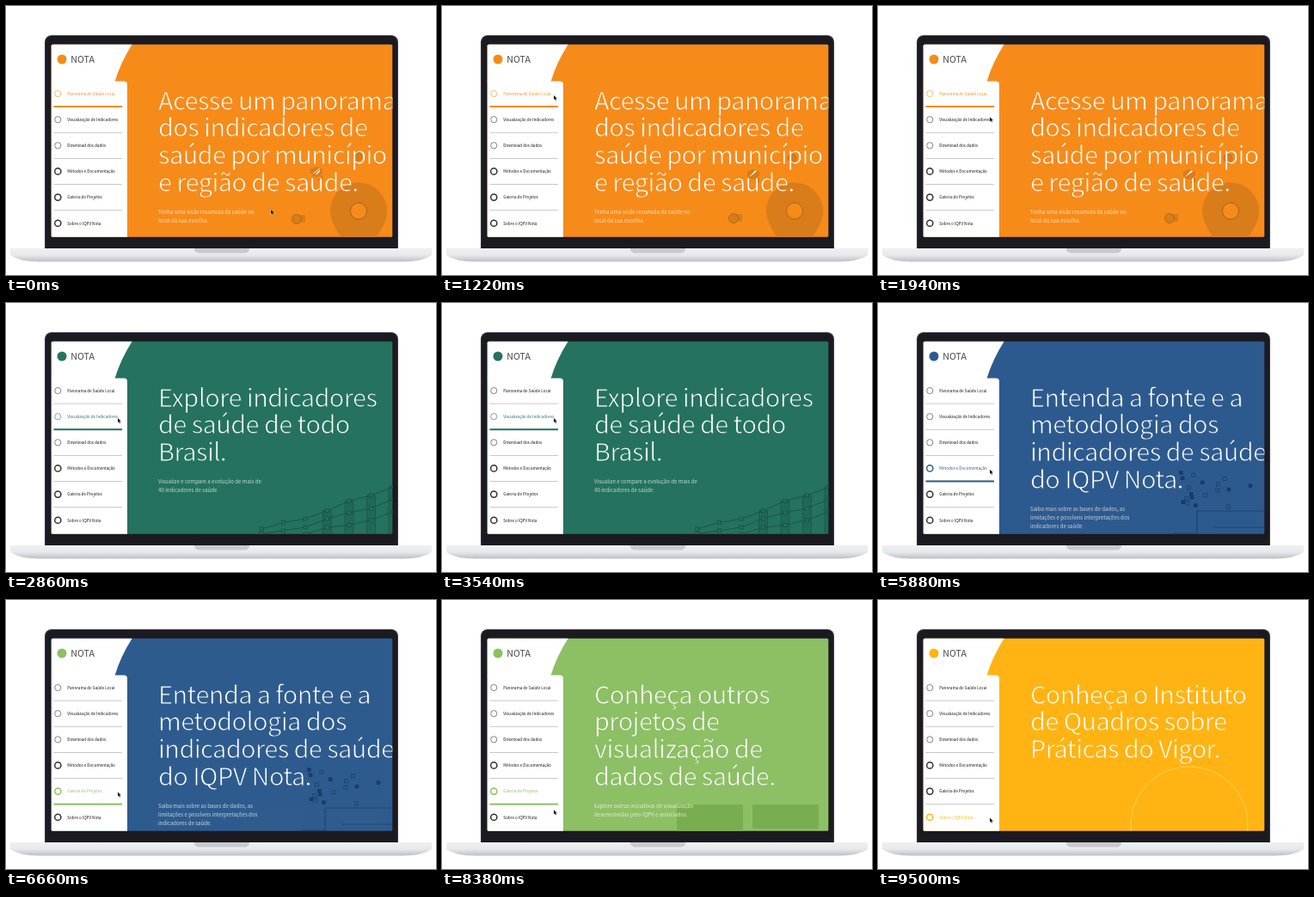
These frames come from a looping animation (500 px wide and 313 px high, 9520 ms). An HTML page with a canvas:

```html
<!DOCTYPE html>
<html lang="pt">
<head>
<meta charset="utf-8">
<title>Nota</title>
<style>
html, body { margin: 0; width: 100%; height: 100%; overflow: hidden; background: #fff; }
canvas { display: block; width: 500px; height: 313px; }
</style>
</head>
<body>
<canvas id="stage"></canvas>
<script>
const W = 500, H = 313, LOOP = 9520, FADE = 200;
const ROW = 30.15;
const ratio = window.devicePixelRatio || 1;
const canvas = document.getElementById('stage');
const ctx = fit(canvas);

const SANS = '"Noto Sans CJK JP", "Noto Sans CJK SC", "Open Sans", sans-serif';
const MENU = ['Panorama de Saúde Local', 'Visualização de Indicadores', 'Download dos dados',
  'Métodos e Documentação', 'Galeria de Projetos', 'Sobre o IQPV Nota'];

const SECTIONS = [
  { at: 0, color: '#f68b1a', art: drawPin,
    title: ['Acesse um panorama', 'dos indicadores de', 'saúde por município', 'e região de saúde.'],
    note: ['Tenha uma visão resumida da saúde no', 'local da sua escolha.'] },
  { at: 2000, color: '#24725f', art: drawChart,
    title: ['Explore indicadores', 'de saúde de todo', 'Brasil.'],
    note: ['Visualize e compare a evolução de mais de', '40 indicadores de saúde.'] },
  { at: 3900, color: '#59254a', art: drawGrid,
    title: ['Acesse e baixe os', 'dados completos do', 'IQPV Nota.'],
    note: ['Ou selecione os dados por local, ano, e', 'grupo de indicadores de seu interesse.'] },
  { at: 5250, color: '#2d5a8e', art: drawBlocks,
    title: ['Entenda a fonte e a', 'metodologia dos', 'indicadores de saúde', 'do IQPV Nota.'],
    note: ['Saiba mais sobre as bases de dados, as', 'limitações e possíveis interpretações dos', 'indicadores de saúde.'] },
  { at: 6650, color: '#8dbf65', art: drawCards,
    title: ['Conheça outros', 'projetos de', 'visualização de', 'dados de saúde.'],
    note: ['Explore outras iniciativas de visualização', 'desenvolvidas pelo IQPV e associados.'] },
  { at: 8480, color: '#ffb414', art: drawRing,
    title: ['Conheça o Instituto', 'de Quadros sobre', 'Práticas do Vigor.'], note: [] }
];

function fit(el) {
  el.width = W * ratio;
  el.height = H * ratio;
  const c = el.getContext('2d');
  c.scale(ratio, ratio);
  return c;
}

function ease(p) {
  p = Math.min(1, Math.max(0, p));
  return p * p * (3 - 2 * p);
}

function randomFrom(seed) {
  return () => (seed = (seed * 16807) % 2147483647) / 2147483647;
}

function text(str, x, y, size, color) {
  ctx.font = `${size}px ${SANS}`;
  ctx.fillStyle = color;
  ctx.fillText(str, x, y);
}

// Light lettering: the regular weight with its outline shaved off.
function lightLayer(rows, x, y, step, size, spacing, shave, color) {
  const layer = document.createElement('canvas');
  const c = fit(layer);
  c.font = `${size}px ${SANS}`;
  c.letterSpacing = spacing + 'px';
  c.lineJoin = 'round';
  c.lineWidth = shave;
  c.fillStyle = color;
  rows.forEach((row, i) => c.fillText(row, x, y + i * step));
  c.globalCompositeOperation = 'destination-out';
  rows.forEach((row, i) => c.strokeText(row, x, y + i * step));
  return layer;
}

function box(x, y, w, h, r, fill) {
  ctx.beginPath();
  ctx.roundRect(x, y, w, h, r);
  ctx.fillStyle = fill;
  ctx.fill();
}

function frame(x, y, w, h, color, width = 0.7) {
  ctx.strokeStyle = color;
  ctx.lineWidth = width;
  ctx.strokeRect(x, y, w, h);
}

function disc(x, y, r, fill, stroke, width = 0.7) {
  ctx.beginPath();
  ctx.arc(x, y, r, 0, 7);
  if (fill) { ctx.fillStyle = fill; ctx.fill(); }
  if (stroke) { ctx.strokeStyle = stroke; ctx.lineWidth = width; ctx.stroke(); }
}

function line(points, color, width = 0.7) {
  ctx.beginPath();
  points.forEach(p => ctx.lineTo(p[0], p[1]));
  ctx.strokeStyle = color;
  ctx.lineWidth = width;
  ctx.stroke();
}

function drawPin(t) {
  const tone = '#d97c1a', edge = '#96591c';
  const sway = ease(t / 1220);
  ctx.beginPath();
  ctx.arc(410, 238.5, 33, Math.PI * 0.85, Math.PI * 0.15);
  ctx.quadraticCurveTo(434, 268, 410, 292);
  ctx.quadraticCurveTo(386, 268, 381, 253.5);
  ctx.fillStyle = tone;
  ctx.fill();
  disc(410, 238.5, 9.5, '#f68b1a', edge);
  const x = 361 + sway, y = 193 + 3 * sway;
  disc(x, y, 6, tone);
  box(x - 7, y - 4, 14, 6, 1, tone);
  line([[x - 4, y + 2], [x + 4, y - 4]], '#fff', 0.8);
  line([[x + 2, y + 9], [x + 6, y + 9], [x + 6, y + 4]], edge);
  disc(409 - 2 * sway, 175 + 2 * sway, 5, tone, edge, 0.4);
  box(340 + sway, 243 - sway, 8, 9, 1, tone);
  disc(338 + sway, 248 - sway, 5.5, tone, edge, 0.6);
}

function drawChart() {
  const ink = '#184f45';
  const xs = Array.from({ length: 7 }, (_, i) => 297 + i * 25.5);
  for (let k = 0; k < 3; k++) {
    const row = xs.map((x, i) => [x, 263 + k * 7 - (50 - k * 9) * (i / 6) ** 1.2 - 2 * Math.sin(i * 2 + k)]);
    if (!k) row.slice(3).forEach(([x, y]) => {
      box(x - 5, y, 10, 60, 0, 'rgba(24,79,69,.3)');
      frame(x - 5, y, 10, 60, ink, 0.6);
    });
    line(row, ink, 0.8);
    row.forEach(([x, y]) => {
      box(x - 2, y - 2, 4, 4, 0.5, '#24725f');
      frame(x - 2, y - 2, 4, 4, ink, 0.8);
    });
  }
}

function drawGrid() {
  const pale = '#92688a', dark = '#2a1026';
  for (let i = 0; i < 25; i++) {
    frame(370 + (i % 5) * 14.5, 178 + Math.floor(i / 5) * 16.3, 8, 8, pale, 0.8);
  }
  frame(380.5, 266, 5, 5, dark, 1);
  frame(393.5, 262, 5.5, 5.5, pale, 0.8);
  box(411, 262, 5.5, 5.5, 0, dark);
}

function drawBlocks() {
  const ink = '#193a66', random = randomFrom(77);
  for (let i = 0; i < 18; i++) {
    const x = 350 + random() * 82, y = 195 + (i + random()) * 2.3;
    if (i % 2) frame(x, y, 4, 4, ink);
    else box(x, y, 4.5, 4.5, 0, ink);
  }
  frame(371, 242, 80, 30, ink, 0.8);
  line([[344, 268], [371, 268]], ink);
  line([[390, 261], [450, 261]], ink);
}

function drawCards() {
  box(273, 238, 77, 32, 1, '#79ae50');
  box(361, 238, 77, 28, 1, '#79ae50');
}

function drawRing() {
  disc(362, 262, 68, null, '#ffd060', 1);
}

function drawSection(s, t, alpha) {
  const top = 115 + s.title.length * 31.7;
  s.head ||= lightLayer(s.title, 177, 120.7, 31.7, 29, -0.63, 0.9, '#fff');
  ctx.globalAlpha = alpha;
  ctx.fillStyle = s.color;
  ctx.fillRect(52, 44, 398, 225);
  s.art(t);
  ctx.drawImage(s.head, 0, 0, W, H);
  s.note.forEach((row, i) => text(row, 177, top + i * 10, 6.1, 'rgba(255,255,255,.75)'));
  ctx.globalAlpha = 1;
}

function drawSidebar(active) {
  const color = SECTIONS[active].color;
  ctx.beginPath();
  ctx.moveTo(52, 44);
  ctx.lineTo(147, 44);
  ctx.quadraticCurveTo(133, 66, 126.5, 88);
  ctx.lineTo(52, 88);
  ctx.fillStyle = '#fff';
  ctx.fill();
  box(52, 87.5, 89, 182, [0, 4, 0, 0], '#fff');

  disc(65, 62, 5.5, color);
  text('NOTA', 75.3, 66, 10.6, '#444');

  MENU.forEach((label, i) => {
    const y = 102 + i * ROW, on = i === active;
    disc(60.3, y, 3.6, null, on ? color : '#333', i < 3 ? 0.6 : 1.5);
    text(label, 71.3, y + 1.8, 4.6, on ? color : '#111');
    if (i < 5) {
      ctx.fillStyle = on ? color : '#bbb';
      ctx.fillRect(55.5, y + (on ? 14 : 14.7), 79.5, on ? 2 : 0.8);
    }
  });
}

// The pointer glides in to the menu, then steps down one row before each section.
function drawPointer(t) {
  const intro = ease((t - 200) / 800);
  const steps = SECTIONS.slice(1).reduce((sum, s) => sum + ease((t - s.at + 300) / 320), 0);
  ctx.save();
  ctx.translate(308 - 178 * intro, 237 - 133 * intro + steps * 29.9);
  ctx.beginPath();
  [[0, 0], [0, 5], [1.2, 4], [2, 6], [3, 5.5], [2.2, 3.7], [3.8, 3.6]].forEach(p => ctx.lineTo(p[0], p[1]));
  ctx.closePath();
  ctx.strokeStyle = 'rgba(255,255,255,.8)';
  ctx.lineWidth = 0.8;
  ctx.stroke();
  ctx.fillStyle = '#111';
  ctx.fill();
  ctx.restore();
}

function drawLaptop() {
  box(45, 34, 411, 250, [8, 8, 0, 0], '#3a3a42');
  box(46, 35, 409, 249, [7, 7, 0, 0], '#1b1a21');
  const shade = ctx.createLinearGradient(0, 282, 0, 298);
  shade.addColorStop(0, '#eef0f3');
  shade.addColorStop(0.5, '#e6e9ec');
  shade.addColorStop(1, '#b9bdc3');
  ctx.beginPath();
  ctx.moveTo(5, 282);
  ctx.lineTo(495, 282);
  ctx.lineTo(495, 290);
  ctx.quadraticCurveTo(484, 297.5, 462, 297.5);
  ctx.lineTo(38, 297.5);
  ctx.quadraticCurveTo(16, 297.5, 5, 290);
  ctx.fillStyle = shade;
  ctx.fill();
  box(219, 282, 64, 5.5, [0, 0, 5, 5], '#c8cad0');
}

function draw(t) {
  ctx.fillStyle = '#fff';
  ctx.fillRect(0, 0, W, H);
  drawLaptop();
  const n = SECTIONS.findLastIndex(s => s.at <= t);
  const now = SECTIONS[n], mix = n ? ease((t - now.at) / FADE) : 1;
  ctx.save();
  ctx.beginPath();
  ctx.roundRect(52.7, 44.7, 396.6, 224, 1.5);
  ctx.clip();
  if (mix < 1) drawSection(SECTIONS[n - 1], t, 1);
  drawSection(now, t, mix);
  drawSidebar(n);
  drawPointer(t);
  ctx.restore();
}

const start = performance.now();
function tick() {
  draw(Math.max(0, performance.now() - start) % LOOP);
  requestAnimationFrame(tick);
}
tick();
</script>
</body>
</html>
```
